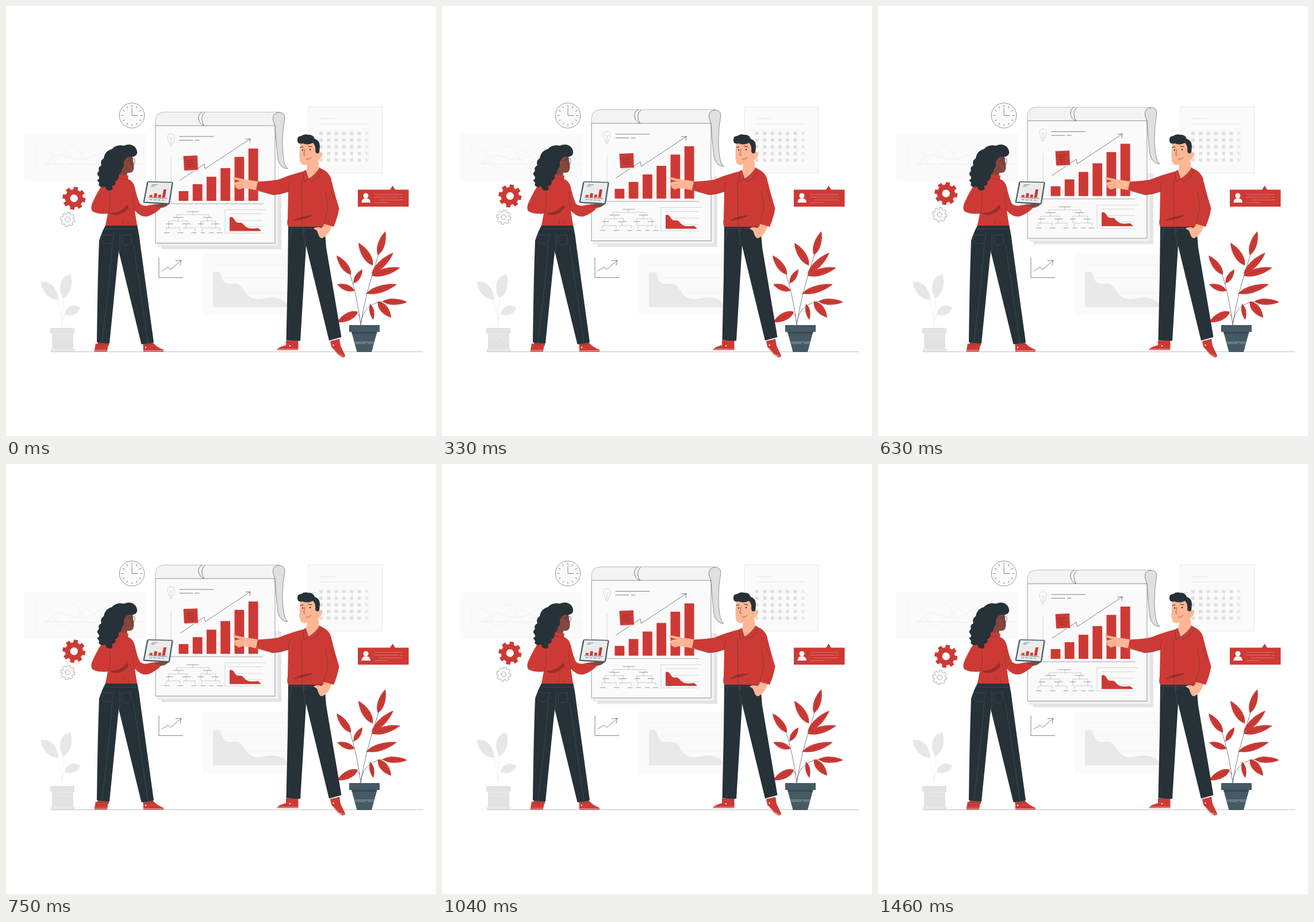
Recreate the animation shown at these times as an HTML page. Size 748 by 748 pixels, loop 1.5 s.

```html
<!DOCTYPE html>
<html lang="en">
<head>
<meta charset="utf-8">
<title>Presentation</title>
<style>
html, body { margin: 0; width: 100%; height: 100%; overflow: hidden; background: #fff; }
svg { display: block; width: 100vw; height: 100vh; }
.red { fill: #cd3a35; }
.deep { fill: #97302b; }
.dark { fill: #263238; }
.slate { fill: #455a64; }
.pale { fill: #fafafa; }
.grey { fill: #e2e2e2; }
.peach { fill: #ffb694; }
.brown { fill: #86463c; }
.line, .soft, .seam { fill: none; stroke: #263238; stroke-width: .6; stroke-linecap: round; stroke-linejoin: round; }
.soft { stroke: #e8e8e8; }
.seam { stroke: #465a64; }
.white { stroke: #fff; }
.edge { stroke: #263238; stroke-width: .5; }
</style>
</head>
<body>
<svg viewBox="0 0 748 748">
  <!-- wall -->
  <g id="wall">
    <rect class="pale" x="32" y="223" width="212" height="81"/>
    <path class="soft" d="M68 275H242M68 273C92 280 99 244 115 244S132 277 148 277S164 250 178 250S200 272 220 264M68 251C84 251 82 282 98 282S128 251 142 253S160 282 176 278S204 250 224 252M70 275C88 250 100 262 120 266S150 262 166 252"/>
    <path class="soft" stroke-dasharray="4 4.1" d="M52 242V286"/>
    <path class="soft" stroke-dasharray="4 11" d="M83 292H235"/>
    <rect class="pale" x="342" y="431" width="158" height="107"/>
    <path stroke="#f0f0f0" d="M360 450H490M360 473H490M360 499H490"/>
    <path fill="#e9e9e9" d="M360 524V465Q366 459 373 465C378 485 384 484 396 483C412 481 413 500 426 507S450 506 464 507S482 511 489 518V524Z"/>
    <rect class="pale" x="526" y="175.500" width="129" height="115" stroke="#e0e0e0" stroke-width=".7"/>
    <path class="soft" style="stroke:#d6d6d6" d="M547 196H573M547 205H628"/>
    <circle cx="219" cy="190.500" r="21.800" class="pale edge"/>
    <path class="line" d="M219 178V190.500H229"/>
    <path class="line" d="M266 438V472.500H308M271 461L282 454L286 458.500L305 442.500M295 443L305 442.500L303 451"/>
  </g>

  <path class="line" style="stroke:#92979a" d="M78 601.500H725"/>

  <!-- floating group -->
  <g id="float">
    <g id="gears"></g>
    <path fill="#e5e5e5" d="M270 300H479V423H270Z"/>
    <path fill="#f1f1f1" d="M264 300H474V418H264Z"/>
    <path class="line" style="stroke:#d2d2d2" d="M264 413V418H474V230"/>
    <path class="pale edge" d="M260 208H468V412.500H260Z"/>
    <path fill="#f3f3f3" class="edge" stroke-opacity=".6" d="M260 208V199Q261 184.500 276 184.500H475Q464 188 465 198L468 208Z"/>
    <path fill="#e0e0e0" class="edge" d="M468 208Q462 196 466 189Q470 184.500 476 185Q485 186 485 195Q481 215 481 236Q481 276 490 283Q477 283 473 266Q470 242 468 208Z"/>
    <path class="line" d="M341 184.500Q334 188 335 196Q336 205 344 208M346 185Q340 190 341 197Q341 204 345 208"/>
    <g class="line">
      <path style="stroke:#b8bcbe" d="M283.500 238Q283 234 281 231Q279 223 287 222Q295 223 293 231Q291 234 290.500 238ZM284 241H290M285 243H289M284 228L287 232L290 228M287 232V237"/>
      <path d="M302 227H361M302 233.500H325M329 233.500H336"/>
      <path stroke-opacity=".3" d="M287 265V344"/>
      <path stroke-opacity=".7" d="M287 344H447"/>
      <path d="M303 303L345 275L346.500 283L425 231M417 231.500L425 231L424 238"/>
    </g>
    <g id="bars" class="red"></g>
    <path fill="#e5e5e5" d="M311 284L335 283L337 287L312 288Z"/>
    <path class="red" d="M308.500 261L333 260L334 285L310 286Z"/>
    <path class="line" stroke-opacity=".8" d="M314 268.500L328 267.800M314 272L325 271.600M314 276L322 275.600M325 275.500L328 275.400M317 279.500L326 279"/>
    <path class="line" stroke-opacity=".4" d="M324.500 358V363M297 367V363H353V367M300 368V374M350 368V374M283 379V374H316V379M339 379V374H365V379M283 380V386M313 380V386M339 380V386M365 380V386M279 391V386H303V391M309 388V386H329V391M341 391V386H372V391"/>
    <path class="line" stroke-opacity=".8" d="M315 357.800H335M291 367.800H309M343 367.800H358M279 379H290M307 379H321M334 379H344M358 379H370M275 394.500H284M299 394.500H308M323 394.500H331M339 394.500H346M354 394.500H361M367 394.500H376"/>
    <path class="line" stroke-opacity=".3" d="M381 354.500H452M381 354.500V395H447M389 361.500H446M389 373H446M389 384H446"/>
    <path class="red" d="M389 391.500V368Q393 365.500 396.500 370C400 377 402 377 408 377S414 386 426 387S437 383 444 391.500Z"/>
  </g>

  <!-- pale plant -->
  <g class="grey">
    <path class="soft" d="M98 560Q98 528 100 505M98 552Q94 524 88 508M99 545Q100 537 106 532"/>
    <path opacity=".8" d="M91 511C76 512 61 496 61 480C76 476 91 492 91 511ZM100 508C88 492 95 469 112 467C118 484 112 502 100 508ZM102 536C104 522 120 517 129 525C126 536 113 541 102 536Z"/>
    <path d="M77 560H119V570H77ZM80 570H117V597H80ZM78 597H120V600.500H78Z"/>
    <path class="line" style="stroke:#f5f5f5" d="M83 579L89 575L95 580L101 575L107 580L113 575M80 571H117M80 597H117"/>
  </g>

  <!-- red plant -->
  <g>
    <path class="line" d="M617 555Q624 508 640 458L655 410M617 555Q611 503 597 462M617 550Q624 514 664 513M637 468L652 450M626 501L648 492M633 518V530M648 514L660 530M606 495L591 489M616 540Q612 532 602 536M604 483L610 472M637 451L628 434"/>
    <g id="leaves" class="red"></g>
    <path class="slate" d="M597 555H650V567H597ZM601 567H645.500L636 602H610.500Z"/>
    <path fill="#37474f" d="M601 567H645.500L644.500 570H602Z"/>
    <path class="line" style="stroke:#cfd8dc" d="M607 584.500H640M608 587H625M629 587H639"/>
  </g>

  <!-- callout -->
  <g>
    <path class="red" d="M612 319.500H668L672.700 312.500L677 319.500H700.500V349H612Z"/>
    <circle cx="626" cy="330" r="4.500" fill="#fff"/>
    <path fill="#fff" d="M618.500 342Q619 335 624 334.500H628Q633.500 335 634 342Z"/>
    <path class="line" style="stroke:#e79a96" d="M641 327.800H689M641 332.500H683M686 332.500H689M648 337.300H689M641 342H665"/>
  </g>

  <!-- woman -->
  <g>
    <path class="brown" d="M160 582H179V591H159ZM238 582H256V592H239Z"/>
    <path class="red" d="M156 587Q166 591 178 587.500L176 601H153.500ZM238.500 588Q248 592 257 587Q263 594 274 598V601.300H239Z"/>
    <path class="line white" d="M154 599H176M240 599.500H273"/>
    <circle cx="243" cy="594" r="1.200" fill="#fff"/>
    <path class="dark" d="M174 380H228Q232 398 234 418L257 585L235.500 588.500L196 426L180 587L158 585C159 512 160 460 162 408Q167 392 174 380Z"/>
    <path class="seam" d="M198 394V422L194 440M167 397Q175 400 188 397L184 411Q174 418 166 408ZM202 399Q211 399 217 397L219 412Q211 418 203 414ZM170 388H230M185 414Q180 480 167 584M222 416L247 586"/>
    <path class="brown" d="M204 264Q213 258 220 262L222 274Q224 285 219 289Q214 291 211 290L210 299L192 298L197 280Z"/>
    <path class="red" d="M191 292L213 295L212 301Q221 304 224 315Q228 334 233 344Q239 349 247 347Q258 344 271 345L272 348Q262 361 246 366Q235 368 224 356L228 382H173L177 361Q161 363 150 357Q146 350 152 339Q161 319 172 305Q182 297 191 292Z"/>
    <path class="deep" d="M181 360Q200 360 210 346Q217 349 208 357Q198 365 185 363Z"/>
    <path class="line" stroke-opacity=".6" d="M178 361Q184 342 180 326M221 324Q220 342 224 356M213 374V380M205 370L203 379M192 297Q199 301 212 301"/>
    <path class="brown" d="M258 347Q268 342 283 344Q279 350 270 351Z"/>
    <path class="dark" d="M184 249Q192 240 205 243Q217 238 225 246Q231 254 226 260Q220 264 214 262Q207 264 206 271Q207 279 201 284Q202 290 196 294Q197 302 190 305Q193 312 184 313Q188 320 181 321Q173 321 173 314Q164 317 161 311Q164 308 158 303Q164 301 161 296Q156 291 162 287Q159 281 166 277Q163 269 170 265Q172 252 184 249Z"/>
    <path class="brown" d="M205 270Q209 266 212 271Q210 278 205 277Z"/>
    <path class="line" d="M211 269L217 267M217 265L224 266Q225 274 221 276Q215 275 217 265Z"/>
    <path class="slate" d="M248 305L289 306Q291 307 290.500 309L285 343Q284 346 282 345.500L240 342.500Q238 342 239 339L245 307Q246 305 248 305Z"/>
    <path fill="#ebebeb" d="M247.500 306.500L288.500 307.500L282.800 343L240.800 340.500Z"/>
    <path class="red" d="M250 328.500L255 329L254.500 332.500L249.500 332ZM258 325.500L263 326L262 333L257 332.700ZM265.500 328L270 328.300L269.500 333.300L264.500 333ZM274 319H279L276.500 333.500L271.500 333.300Z"/>
    <path class="line" d="M254 311H263M253 313.500H258M248 333L280 335M250 336.500L254 336.800M257 337L261 337.200M264 337.300L268 337.500M271 337.700L275 338"/>
  </g>

  <!-- man -->
  <g>
    <path class="red" d="M487 582H508.500V598.500H471Q473 593 487 590ZM564 583L580 579L582 591L590 608Q590 612 585 611L577 606L566 593Z"/>
    <path class="line white" d="M472 597H508M568 595L579 606L589 610"/>
    <circle cx="494" cy="591" r="1.200" fill="#fff"/>
    <circle cx="569.500" cy="590" r="1.200" fill="#fff"/>
    <path class="dark" d="M491 382H554L557 420L583.500 576L562 582L522 417L512 582.500L487.500 581.500L490 470Z"/>
    <path class="seam" d="M516 384L517 396Q520 410 521 420M491 387H551M497 386Q497 400 492 406M541 390L548 403M530 386V390M517 391A2 2 0 0 0 521 391A2 2 0 0 0 517 391"/>
    <path class="peach" d="M554 377L567 380Q563 398 550 404Q546 404 544 399L541 391L535 387Q540 383 549 386Z"/>
    <path class="peach" d="M438 305Q426 303 417 302L398 298Q394 298 395 301L409 305Q398 305 397 309Q396 312 399 312Q397 316 402 317Q404 321 411 317L422 318L438 321Z"/>
    <path class="line" style="stroke:#d98a70" d="M400 312L412 310M403 317L413 314M409 305L414 306"/>
    <path class="red" d="M516 288L543 281Q560 286 565 299Q572 328 579.500 352Q577 368 570 384L553 379L552 384H491Q488 379 490 370L491 323Q477 328 464 328.500L435 320L438 305.500Q462 304 474 302Q495 293 516 288Z"/>
    <path class="deep" d="M501 373Q511 365 535 364Q526 370 501 374Z"/>
    <path class="line" stroke-opacity=".65" d="M491 322Q491 313 494 306M556 322L560 351L553 379M514 302L515 384M491 323Q477 328 464 328.500L440 322M565 320L570 335"/>
    <path class="peach" d="M512 239Q509 264 512 272Q515 278 524 276L522 288L526 301Q541 292 545 283L543 268Q550 264 550 257Q548 252 544 255L543 237Q528 232 512 239Z"/>
    <path class="red" d="M521 285L526 300L518 306L516 289ZM526 301Q538 294 546 281L549 288Q544 299 532 305Z"/>
    <path class="line" stroke-opacity=".7" d="M521 286L526 300L518 306L517 290M526 301Q538 294 546 281L549 288Q544 299 532 305L526 301"/>
    <path class="dark" d="M507 235Q506 226 514 226Q518 222 526 224Q534 223 537 231Q546 234 546 244L545 255Q539 259 538 252Q539 243 534 238Q525 243 516 239Q508 241 507 235Z"/>
    <path class="line" d="M520 249L518 259L521 260M522 266Q527 268 531 263"/>
    <path class="line" style="stroke-width:1.100" d="M512 246L517 245M526 244L532 245"/>
    <circle class="dark" cx="516" cy="250.500" r="1.200"/>
    <circle class="dark" cx="529" cy="249.800" r="1.200"/>
  </g>
</svg>
<script>
const NS = "http://www.w3.org/2000/svg";
const byId = id => document.getElementById(id);

function add(parent, tag, attrs) {
  const el = document.createElementNS(NS, tag);
  for (const key in attrs) el.setAttribute(key, attrs[key]);
  parent.append(el);
  return el;
}

// Calendar cells and clock ticks
const wall = byId("wall");
for (let row = 0; row < 5; row++)
  for (let col = 0; col < 7; col++)
    add(wall, "rect", { x: 545 + col * 13.35, y: 219 + row * 11.6, width: 5.6, height: 5.4,
      fill: col === 6 ? "#ebebeb" : "#dedede" });
for (let i = 0; i < 12; i++)
  add(wall, "path", { d: "M219 172.500V175.500", class: "line", transform: `rotate(${i * 30} 219 190.500)` });

// Chart bars
[322, 310, 297, 282, 262.500, 248].forEach((top, i) =>
  add(byId("bars"), "rect", { x: 300.5 + i * 24.25, y: top, width: 16.8, height: 339 - top }));

function gear(cx, cy, outer, inner, hole, tilt, attrs) {
  const pts = [];
  for (let i = 0; i < 8; i++)
    for (const [turn, r] of [[-.32, inner], [-.23, outer], [.23, outer], [.32, inner]]) {
      const a = (i + turn) * Math.PI / 4 - Math.PI / 2;
      pts.push((cx + r * Math.cos(a)).toFixed(2) + " " + (cy + r * Math.sin(a)).toFixed(2));
    }
  const ring = `M${cx - hole} ${cy}a${hole} ${hole} 0 1 0 ${2 * hole} 0a${hole} ${hole} 0 1 0 ${-2 * hole} 0Z`;
  add(byId("gears"), "path", { d: `M${pts.join("L")}Z${ring}`, "fill-rule": "evenodd",
    transform: `rotate(${tilt} ${cx} ${cy})`, ...attrs });
}
gear(118.3, 334.5, 20.2, 15.6, 6.7, 10, { class: "red" });
gear(107.3, 371.3, 12.6, 9.8, 4.3, 10, { class: "line", "stroke-opacity": .65 });

function leaf(x, y, tx, ty, w) {
  const len = Math.hypot(tx - x, ty - y);
  const nx = (y - ty) / len * w, ny = (tx - x) / len * w;
  const at = (k, s) => `${x + (tx - x) * k + nx * s} ${y + (ty - y) * k + ny * s}`;
  add(byId("leaves"), "path", {
    d: `M${x} ${y}C${at(.2, .9)} ${at(.65, .9)} ${tx} ${ty}C${at(.65, -.9)} ${at(.2, -.9)} ${x} ${y}Z` });
  add(byId("leaves"), "path", { d: `M${x} ${y}L${at(.85, 0)}`, class: "line", "stroke-opacity": .5 });
}
[
  [647, 433, 660, 392, 9], [638, 451, 613, 412, 10], [636, 466, 674, 429, 9],
  [636, 469, 686, 455, 9], [627, 500, 680, 484, 9], [655, 514, 698, 515, 8],
  [647, 514, 670, 542, 10], [634, 519, 639, 546, 6], [600, 467, 575, 434, 9],
  [605, 482, 620, 458, 7], [606, 495, 576, 484, 8], [612, 532, 576, 550, 10]
].forEach(args => leaf(...args));

// The board and gears bob once per loop, at 24 poses a second
const LOOP = 1500, POSES = 36, RISE = 8.8, LEAD = .5;
const float = byId("float");
const start = performance.now();

function draw() {
  const t = (performance.now() - start) % LOOP;
  const pose = Math.floor(t / LOOP * POSES + .1) + LEAD;
  const y = -RISE * (1 - Math.cos(pose / POSES * 2 * Math.PI)) / 2;
  float.setAttribute("transform", `translate(0 ${y.toFixed(3)})`);
  requestAnimationFrame(draw);
}
draw();
</script>
</body>
</html>
```
